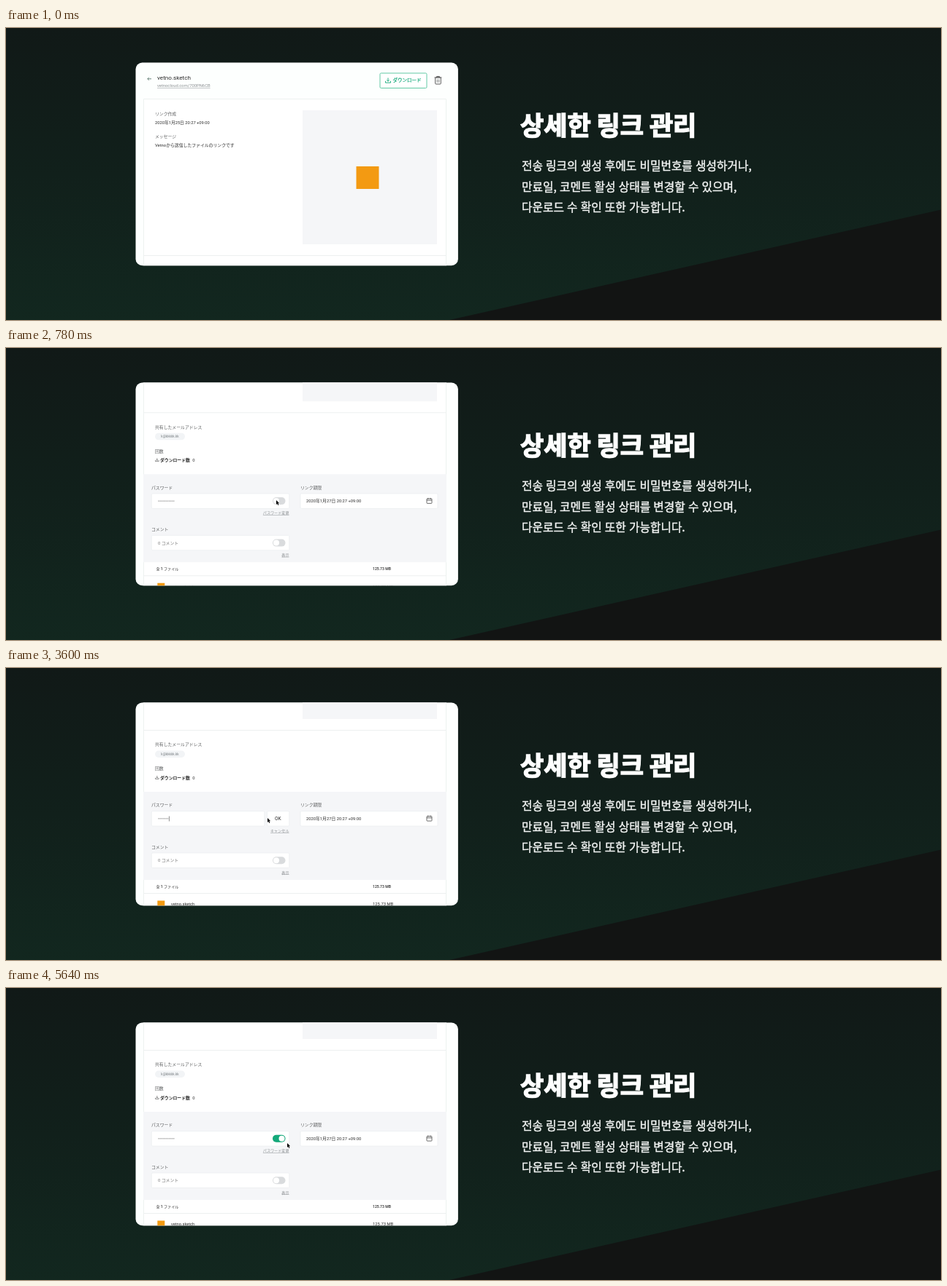
An HTML page with a canvas for the animation above (5700 ms loop, 1280x401 px).

```html
<!DOCTYPE html>
<html lang="ko">
<head>
<meta charset="utf-8">
<title>상세한 링크 관리</title>
<style>
  html, body { margin: 0; width: 100%; height: 100%; overflow: hidden; background: #111715; }
  canvas { display: block; width: 100%; height: 100%; }
</style>
</head>
<body>
<canvas id="stage" width="1280" height="401"></canvas>
<script>
const ctx = document.getElementById('stage').getContext('2d');
const LOOP = 5700, STEP = 60;
const KR = '"Noto Sans CJK KR", "Noto Sans CJK", sans-serif';
const JP = 'Roboto, "Noto Sans CJK JP", "Noto Sans CJK", sans-serif';
const INK = '#2b2b2b', LABEL = '#5f6162', MUTED = '#8b8f92', GREEN = '#13a97a', ORANGE = '#f39a12';
const CARD = [177.5, 47.6, 441.4, 278.6, 9];
const EDIT_START = 1860, EDIT_END = 4620, TYPE_START = 2400, KEY_TIME = 170, DOTS = 11;

// time, x, y
const path = [
  [540, 392, 332], [720, 370, 209], [1080, 370, 209], [1400, 371, 207],
  [2040, 371, 207], [2400, 358, 206], [4260, 358, 206], [4500, 369, 210],
  [5100, 369, 210], [5460, 385, 213]
];

const clamp = (v, lo = 0, hi = 1) => Math.min(hi, Math.max(lo, v));
const smooth = v => { v = clamp(v); return v * v * (3 - 2 * v); };

function pointerAt(t) {
  if (t < path[0][0]) return null;
  for (let i = 1; i < path.length; i++) {
    const [t0, x0, y0] = path[i - 1], [t1, x1, y1] = path[i];
    if (t < t1) {
      const k = smooth((t - t0) / (t1 - t0));
      return { x: x0 + (x1 - x0) * k, y: y0 + (y1 - y0) * k };
    }
  }
  const [, x, y] = path[path.length - 1];
  return { x, y };
}

// embolden: outline width that thickens the glyphs beyond the font's weight
function text(str, x, base, size, color, { weight = 400, family = JP, align = 'left', underline, embolden } = {}) {
  ctx.font = `${weight} ${size}px ${family}`;
  ctx.fillStyle = color;
  ctx.textAlign = align;
  ctx.fillText(str, x, base);
  if (embolden) {
    ctx.strokeStyle = color;
    ctx.lineWidth = embolden;
    ctx.lineJoin = 'miter';
    ctx.miterLimit = 2;
    ctx.strokeText(str, x, base);
  }
  if (underline) {
    const w = ctx.measureText(str).width;
    ctx.fillRect(align === 'right' ? x - w : x, base + 1, w, 0.5);
  }
}

function box(x, y, w, h, r, fill, stroke, line = 0.8) {
  ctx.beginPath();
  ctx.roundRect(x, y, w, h, r);
  if (fill) { ctx.fillStyle = fill; ctx.fill(); }
  if (stroke) { ctx.strokeStyle = stroke; ctx.lineWidth = line; ctx.stroke(); }
}

function strokes(color, width, ...lines) {
  ctx.strokeStyle = color;
  ctx.lineWidth = width;
  ctx.beginPath();
  for (const [x, y, ...rest] of lines) {
    ctx.moveTo(x, y);
    for (let i = 0; i < rest.length; i += 2) ctx.lineTo(rest[i], rest[i + 1]);
  }
  ctx.stroke();
}

function shape(points, fill, stroke, width) {
  ctx.beginPath();
  points.forEach(([x, y]) => ctx.lineTo(x, y));
  ctx.closePath();
  ctx.lineJoin = 'round';
  ctx.strokeStyle = stroke;
  ctx.lineWidth = width;
  ctx.stroke();
  ctx.fillStyle = fill;
  ctx.fill();
}

function downloadIcon(x, y, s, color) {
  strokes(color, s * 0.13,
    [x + s / 2, y, x + s / 2, y + s * 0.65],
    [x + s * 0.25, y + s * 0.42, x + s / 2, y + s * 0.67, x + s * 0.75, y + s * 0.42],
    [x, y + s * 0.62, x, y + s * 0.95, x + s, y + s * 0.95, x + s, y + s * 0.62]);
}

function trashIcon(x, y) {
  const color = '#5a5a5a';
  strokes(color, 1, [x, y + 2, x + 10, y + 2], [x + 3, y + 1.5, x + 3, y + 0.5, x + 7, y + 0.5, x + 7, y + 1.5]);
  box(x + 1.2, y + 2, 7.6, 9, 1, null, color, 1);
  strokes(color, 0.8, [x + 3.8, y + 4.5, x + 3.8, y + 8.8], [x + 6.2, y + 4.5, x + 6.2, y + 8.8]);
}

function calendarIcon(x, y) {
  box(x, y + 1, 7, 6.5, 0.8, null, '#4a4a4a', 0.8);
  strokes('#4a4a4a', 0.8, [x, y + 3.2, x + 7, y + 3.2], [x + 1.8, y, x + 1.8, y + 1.8], [x + 5.2, y, x + 5.2, y + 1.8]);
}

function toggle(x, y, on) {
  box(x, y, 17.5, 10, 5, '#d9dbdd');
  ctx.globalAlpha = on;
  box(x, y, 17.5, 10, 5, GREEN);
  ctx.globalAlpha = 1;
  ctx.fillStyle = '#fff';
  ctx.beginPath();
  ctx.arc(x + 5 + 7.5 * on, y + 5, 4, 0, Math.PI * 2);
  ctx.fill();
}

const field = (x, y, w) => box(x, y, w, 20.5, 1.5, '#fff', '#eaecef', 0.7);

function rule(y) {
  ctx.fillStyle = '#edf0f0';
  ctx.fillRect(188, y, 415, 1);
}

function drawHeader() {
  strokes('#4a6b60', 0.8, [199, 69.8, 193.8, 69.8], [195.8, 67.8, 193.8, 69.8, 195.8, 71.8]);
  text('vetno.sketch', 207, 71, 8.1, INK);
  text('vetnocloud.com/700PN6CB', 207, 81, 5.85, MUTED, { underline: true });
  box(512, 62, 64, 20.5, 1.5, '#fff', '#62c9a4', 1);
  downloadIcon(519.5, 68.5, 7, GREEN);
  text('ダウンロード', 529.5, 74.4, 6.5, GREEN, { weight: 500, embolden: 0.2 });
  trashIcon(586.5, 66);
}

function drawDetails() {
  text('リンク作成', 204, 119.7, 5.85, LABEL);
  text('2020年1月25日 20:27 +09:00', 204, 131.7, 5.75, INK);
  text('メッセージ', 204, 150.7, 5.85, LABEL);
  text('Vetnoから送信したファイルのリンクです', 204, 162.7, 5.85, INK);
  box(406, 113, 184, 184, 0, '#f5f6f8');
  box(479.5, 190, 31, 31, 0, ORANGE);
  rule(312);
  text('共有したメールアドレス', 204, 334.3, 5.85, LABEL);
  box(204, 340.5, 41, 9.5, 4.7, '#f2f4f6');
  text('k@kkkkk.kk', 224.5, 346.8, 4.7, '#7d8286', { align: 'center' });
  text('回数', 204, 367.3, 5.85, LABEL);
  downloadIcon(204.5, 375, 4.6, '#444');
  text('ダウンロード数', 211, 379.7, 5.85, INK, { weight: 700 });
  text('0', 255.3, 379.6, 5.85, INK);
}

function drawPassword(t) {
  const editing = t >= EDIT_START && t < EDIT_END;
  const typed = clamp(Math.floor((t - TYPE_START) / KEY_TIME), 0, DOTS);
  const count = editing ? typed : DOTS;
  text('パスワード', 199, 417.4, 5.85, LABEL);
  field(199.3, 423.6, editing ? 154.5 : 188.5);
  ctx.fillStyle = '#666';
  for (let i = 0; i < count; i++) {
    ctx.beginPath();
    ctx.arc(209 + i * 2.08, 433.8, 0.65, 0, Math.PI * 2);
    ctx.fill();
  }
  if (editing) {
    const busy = t > TYPE_START && typed < DOTS;
    if (busy || t % 1000 < 500) {
      ctx.fillStyle = '#444';
      ctx.fillRect(208.4 + count * 2.08, 430.5, 0.6, 7);
    }
    field(357.5, 423.6, 30.3);
    text('OK', 372.3, 436.1, 6.6, INK, { align: 'center' });
  } else {
    toggle(365, 428.8, smooth((t - EDIT_END) / 180));
  }
  text(editing ? 'キャンセル' : 'パスワード変更', 387.5, 452, 5.1, MUTED, { align: 'right', underline: true });
}

function drawSettings(t) {
  box(188, 397, 415, 121, 0, '#f5f6f8');
  drawPassword(t);
  text('リンク期限', 403, 417.4, 5.85, LABEL);
  field(403, 423.6, 188);
  text('2020年1月27日 20:27 +09:00', 411, 436, 5.8, INK);
  calendarIcon(576, 429.6);
  text('コメント', 199, 474.9, 5.85, LABEL);
  field(199.3, 481, 188.5);
  text('0 コメント', 208, 493.4, 5.85, '#777');
  toggle(365, 486.3, 0);
  text('表示', 387.5, 509.5, 5.1, MUTED, { align: 'right', underline: true });
}

function drawFiles() {
  text('全 1 ファイル', 205.5, 529, 5.1, INK, { weight: 500 });
  text('125.73 MB', 502, 528.8, 5.1, INK, { weight: 500 });
  rule(536);
  box(207.3, 546.5, 10, 10, 0, ORANGE);
  text('vetno.sketch', 226, 553.4, 5.7, INK);
  text('125.73 MB', 502, 553.4, 5.85, INK);
}

function drawPointer(t) {
  const p = pointerAt(t);
  if (!p) return;
  ctx.save();
  ctx.translate(p.x, p.y);
  if (t >= 1020 && p.x > 361 && p.x < 380) {
    shape([[-0.7, 0], [0.5, 0], [0.7, 2.9], [3.9, 3.6], [4.4, 4.6], [3.8, 7.8], [0.3, 7.8], [-2, 4.8], [-1.5, 4.1], [-0.6, 4.9]],
      '#fff', '#222', 1.4);
    strokes('#222', 0.5, [1, 5, 1, 6.7], [2.4, 5, 2.4, 6.7]);
  } else {
    shape([[0, 0], [0, 5.9], [1.4, 4.7], [2.3, 6.9], [3.3, 6.5], [2.4, 4.3], [4.2, 4.2]], '#000', '#fff', 0.8);
  }
  ctx.restore();
}

function drawBackdrop() {
  const g = ctx.createLinearGradient(0, 0, 0, 401);
  g.addColorStop(0, '#111917');
  g.addColorStop(0.5, '#11201b');
  g.addColorStop(1, '#12271f');
  ctx.fillStyle = g;
  ctx.fillRect(0, 0, 1280, 401);
  ctx.fillStyle = '#121413';
  ctx.beginPath();
  ctx.moveTo(607, 401);
  ctx.lineTo(1280, 249.5);
  ctx.lineTo(1280, 401);
  ctx.fill();
}

function drawCopy() {
  text('상세한 링크 관리', 704, 147.2, 35, '#fff', { family: KR, weight: 900, embolden: 1.5 });
  const style = { family: KR, weight: 500, embolden: 0.4 };
  ctx.wordSpacing = '0.6px';
  ['전송 링크의 생성 후에도 비밀번호를 생성하거나,',
   '만료일, 코멘트 활성 상태를 변경할 수 있으며,',
   '다운로드 수 확인 또한 가능합니다.'
  ].forEach((line, i) => text(line, 706, 195 + i * 28.5, 15.75, '#f4f6f5', style));
  ctx.wordSpacing = '0px';
}

function drawCard(t) {
  ctx.save();
  box(...CARD, '#fdfffe');
  ctx.clip();
  ctx.save();
  ctx.translate(0, -227 * smooth(t / 840));
  box(188.5, 97.5, 414, 500, 0, '#fff', '#edf2f0', 1);
  drawHeader();
  drawDetails();
  drawSettings(t);
  drawFiles();
  ctx.restore();
  drawPointer(t);
  ctx.restore();
}

function frame() {
  const now = performance.now() % LOOP;
  const t = Math.floor(now / STEP) * STEP;
  drawBackdrop();
  drawCopy();
  drawCard(t);
  requestAnimationFrame(frame);
}
frame();
</script>
</body>
</html>
```
